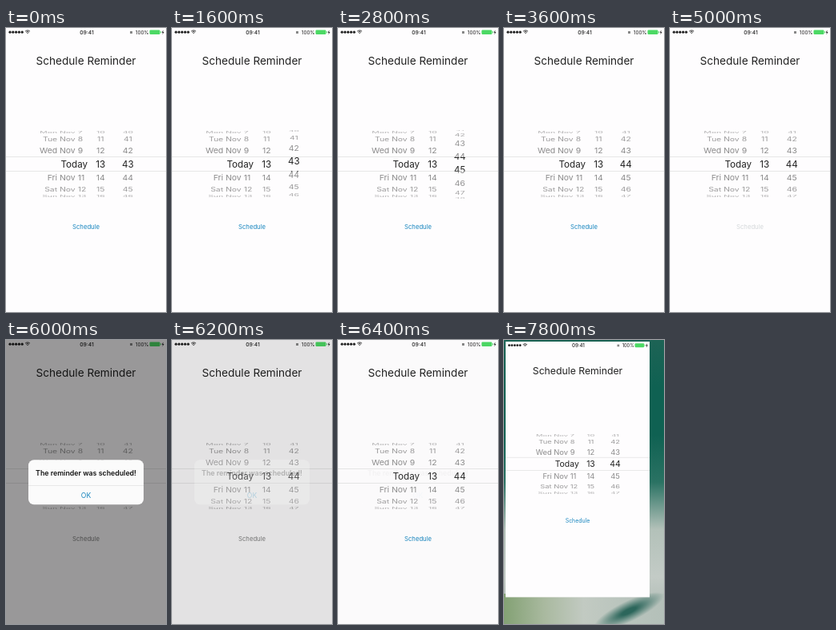
Recreate the animation shown at these times as an HTML page with a canvas. Size 200 px wide and 356 px high, loop 8 s.

```html
<!DOCTYPE html>
<html lang="en">
<head>
<meta charset="utf-8">
<title>Schedule Reminder</title>
<style>
html, body { margin: 0; width: 100%; height: 100%; overflow: hidden; background: #fff; }
canvas { display: block; width: 200px; height: 356px; }
</style>
</head>
<body>
<canvas id="stage"></canvas>
<script>
const W = 200, H = 356, LOOP = 8000, STEP = 200;
const canvas = document.getElementById('stage');
const dpr = window.devicePixelRatio || 1;
canvas.width = W * dpr;
canvas.height = H * dpr;
const ctx = canvas.getContext('2d');

const BLUE = '#1886bf', INK = '#222';
const MID = 170.8, BAND = 18, PITCH = 17, RADIUS = 43, TURN = 23.3 * Math.PI / 180;
const DAYS = ['Sun', 'Mon', 'Tue', 'Wed', 'Thu', 'Fri', 'Sat'];

const progress = (t, from, length) => Math.min(1, Math.max(0, (t - from) / length));
const easeOut = (p, n) => 1 - (1 - p) ** n;
const smooth = p => p * p * (3 - 2 * p);

function rect(x, y, w, h, color) {
  ctx.fillStyle = color;
  ctx.fillRect(x, y, w, h);
}

function rounded(x, y, w, h, r, color) {
  ctx.fillStyle = color;
  ctx.beginPath();
  ctx.roundRect(x, y, w, h, r);
  ctx.fill();
}

// y is the middle of the capitals
function text(str, x, y, size, color, align = 'center', weight = 400) {
  ctx.font = `${weight} ${size}px Inter, Roboto, sans-serif`;
  ctx.textAlign = align;
  ctx.fillStyle = color;
  ctx.fillText(str, x, y + size * 0.36);
}

function clipTo(draw, ...boxes) {
  ctx.save();
  ctx.beginPath();
  boxes.forEach(b => ctx.rect(...b));
  ctx.clip();
  draw();
  ctx.restore();
}

function dateCell(day, size, color) {
  if (day === 10) return text('Today', 102, 0, size, color, 'right');
  text(`${DAYS[(day + 1) % 7]} Nov`, 86.7, 0, size, color, 'right');
  text(day, 89.8, 0, size, color, 'left');
}
const numberCell = x => (n, size, color) => text(n, x, 0, size, color);

function wheel(value, cell) {
  const near = Math.round(value);
  const eachRow = draw => {
    for (let n = near - 4; n <= near + 4; n++) {
      const offset = n - value;
      if (Math.abs(offset) > 3.6) continue;
      ctx.save();
      draw(n, offset);
      ctx.restore();
    }
  };
  const top = MID - BAND / 2, bottom = MID + BAND / 2;
  clipTo(() => eachRow((n, offset) => {
    const depth = Math.cos(offset * TURN);
    ctx.translate(0, MID + RADIUS * Math.sin(offset * TURN));
    ctx.scale(1, depth);
    cell(n, 10.4, `rgba(0,0,0,${0.2 + 0.28 * depth})`);
  }), [0, 100, W, top - 100], [0, bottom, W, 60]);
  clipTo(() => eachRow((n, offset) => {
    ctx.translate(0, MID + offset * PITCH);
    cell(n, 11.6, INK);
  }), [0, top, W, BAND]);
}

function minuteAt(t) {
  return 43 + 2 * smooth(progress(t, 1400, 1000)) - easeOut(progress(t, 2600, 1000), 2.6);
}

function statusBar() {
  for (let i = 0; i < 5; i++) rounded(3.4 + i * 3.8, 3.6, 3.2, 3.2, 1.6, INK);

  ctx.strokeStyle = INK;
  ctx.lineWidth = 0.9;
  for (const r of [1, 2.6, 4.2]) {
    ctx.beginPath();
    ctx.arc(27, 7.2, r, -Math.PI * 0.75, -Math.PI * 0.25);
    ctx.stroke();
  }

  text('09:41', 101, 5.3, 6.7, INK, 'center', 500);
  rect(155, 4, 3, 3, '#888');
  text('100%', 170.2, 5.3, 6.3, INK);

  rounded(179.5, 2.6, 13, 5.4, 1.2, '#4cd964');
  rect(193, 4.2, 0.8, 2.2, '#4cd964');
  ctx.fillStyle = INK;
  ctx.fill(new Path2D('M196.6 2.6L194.6 5.7H196L195.4 8.2L197.6 4.9H196.2Z'));
}

function screen(t) {
  rect(0, 0, W, H, '#fefdfe');
  statusBar();
  text('Schedule Reminder', 100, 41, 13.6, INK);

  rect(0, 161, W, 0.6, '#d9d9d9');
  rect(0, 179.4, W, 0.6, '#d9d9d9');
  wheel(10, dateCell);
  wheel(13, numberCell(118.3));
  wheel(minuteAt(t), numberCell(152.3));

  let color = BLUE;
  if (t >= 5000 && t < 6400) color = t < 5200 ? '#d4d8da' : '#808080';
  text('Schedule', 100, 249, 7.7, color);
}

function alertBox(t) {
  const shown = easeOut(progress(t, 5000, 1000), 4);
  const left = (1 - progress(t, 6000, 700)) ** 4;
  const alpha = shown * left;
  if (!alpha) return;

  rect(0, 0, W, H, `rgba(0,0,0,${0.4 * alpha})`);
  const zoom = 1 + 0.17 * (1 - shown);
  ctx.save();
  ctx.globalAlpha = alpha;
  ctx.translate(100, 178.2);
  ctx.scale(zoom, zoom);
  rounded(-72, -28, 144, 56, 7, '#fbfbfb');
  text('The reminder was scheduled!', 0, -11.7, 8.8, '#111', 'center', 600);
  rect(-72, 4, 144, 0.6, '#dcdcdc');
  text('OK', 0, 16.6, 8.6, BLUE);
  ctx.restore();
}

function gradient(x, y, colors) {
  const g = ctx.createLinearGradient(0, 0, x, y);
  colors.forEach((c, i) => g.addColorStop(i / (colors.length - 1), c));
  return g;
}

// Soft sea and sand: teal water above, pale foam below, one dark swell
function wallpaper() {
  rect(0, 0, W, H, gradient(0, H, ['#1d6355', '#0f6152', '#0f6152', '#2a7263', '#b3c1b9', '#c3cbc6', '#a9b7af']));
  rect(0, 318, W, 38, gradient(W, 0, ['#83a174', '#a9b99f', '#c2cac2', '#b9c4bd', '#b4c0b9']));

  ctx.save();
  ctx.translate(156, 340);
  ctx.rotate(-0.45);
  ctx.scale(48, 13);
  const swell = ctx.createRadialGradient(0, 0, 0.2, 0, 0, 1);
  swell.addColorStop(0, '#2c665b');
  swell.addColorStop(1, '#2c665b00');
  rect(-1, -1, 2, 2, swell);
  ctx.restore();
}

function render(t) {
  ctx.setTransform(dpr, 0, 0, dpr, 0, 0);
  if (t >= 7800) {
    wallpaper();
    ctx.translate(2, 2);
    ctx.scale(0.9, 0.9);
  }
  screen(t);
  alertBox(t);
}

// The picture advances in 200 ms steps
const start = performance.now();
function tick() {
  const t = (performance.now() - start) % LOOP;
  render(Math.floor(t / STEP) * STEP);
  requestAnimationFrame(tick);
}
tick();
</script>
</body>
</html>
```
